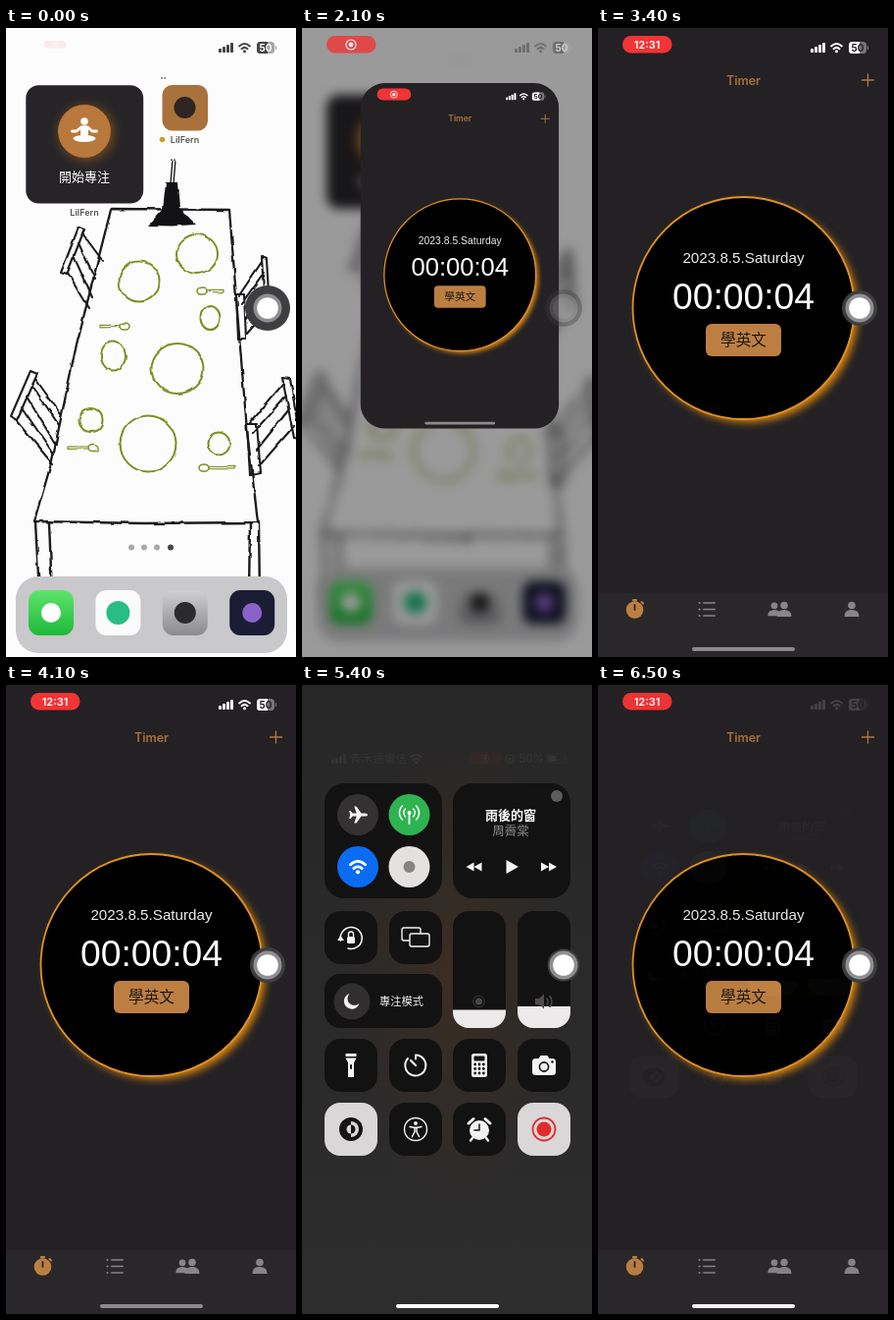
Write an HTML page that moves like this. It is 296x640 px and loops after 6.6 s.

```html
<!DOCTYPE html>
<html lang="zh-Hant">
<head>
<meta charset="utf-8">
<title>Focus timer</title>
<style>
html, body { margin: 0; width: 100%; height: 100%; overflow: hidden; background: #232124 }
svg { display: block; width: 296px; height: 640px; font-family: Inter, "Noto Sans CJK TC", "Noto Sans CJK", sans-serif }
.time { font-family: "Liberation Sans", Arial, sans-serif }
</style>
</head>
<body>
<svg id="stage" viewBox="0 0 296 640"></svg>
<script>
const LOOP = 6600, DARK = '#131212', LIGHT = '#d9d7d8', BROWN = '#bd7f41', GREY = '#878588';
const $ = id => document.getElementById(id);

// Drawing helpers
const dot = (x, y, r, fill, more = '') => `<circle cx="${x}" cy="${y}" r="${r}" fill="${fill}" ${more}/>`;
const ring = (x, y, r, stroke, w) => dot(x, y, r, 'none', `stroke="${stroke}" stroke-width="${w}"`);
const oval = (x, y, rx, ry, more) => `<ellipse cx="${x}" cy="${y}" rx="${rx}" ry="${ry}" ${more}/>`;
const box = (x, y, w, h, r, fill, more = '') => `<rect x="${x}" y="${y}" width="${w}" height="${h}" rx="${r}" fill="${fill}" ${more}/>`;
const line = (d, stroke, w = 1.5, fill = 'none') =>
  `<path d="${d}" stroke="${stroke}" stroke-width="${w}" fill="${fill}" stroke-linecap="round" stroke-linejoin="round"/>`;
const shape = (d, fill) => `<path d="${d}" fill="${fill}"/>`;
const text = (x, y, s, size, fill, weight = 400, more = 'text-anchor="middle"') =>
  `<text x="${x}" y="${y}" font-size="${size}" fill="${fill}" font-weight="${weight}" ${more}>${s}</text>`;
const at = (x, y, inner) => `<g transform="translate(${x} ${y})">${inner}</g>`;
const group = (id, inner) => `<g id="${id}">${inner}</g>`;

// Status bar parts
const signal = (x, y, fill) => [4, 6, 8, 10].map((h, i) => box(x + i * 4, y - h, 3, h, .8, fill)).join('');
const wifi = (x, y, col, k = 1) => `<g transform="translate(${x} ${y}) scale(${k})">` +
  line('M-5.4-1.6q5.4-4.8 10.8 0M-3 1.2q3-2.6 6 0', col, 2) + dot(0, 3.8, 1.5, col) + '</g>';
const battery = (x, y, fg, back, ink) => box(x, y, 18, 12, 3.5, back) +
  shape(`M${x + 11} ${y}h-7.5a3.5 3.5 0 0 0-3.5 3.5v5a3.5 3.5 0 0 0 3.5 3.5h7.5z`, fg) +
  box(x + 18.8, y + 4, 1.2, 4, .6, back) + text(x + 9, y + 9.6, '50', 10, ink, 700);
const statusBar = (fg, back, ink) => signal(217, 25, fg) + wifi(243.5, 20, fg) + battery(256, 14, fg, back, ink);
const pill = name => group(name + 'Pill', box(25, 8, 50.5, 17.5, 8.5, '#f23434') +
  group(name + 'Rec', ring(50, 17, 5, '#fff', 1.2) + dot(50, 17, 2.4, '#fff')) +
  group(name + 'Clock', text(50, 21, '12:31', 11, '#fff', 600)));

function wallpaper() {
  const ink = '#1b1a1c', green = '#7f8e22';
  const plates = [[195, 230, 21, 20], [136, 258, 20.5, 20.5], [208.5, 295, 10, 12], [109.5, 333.5, 12.5, 15],
    [175, 346.5, 26.5, 25.5], [86.5, 399, 12, 12], [145, 423, 28.5, 28.5], [217, 423, 11.5, 11.5]];
  const spoons = [[121, 303.5, -25], [89, 427, -26], [200, 267.5, 21], [202, 447.5, 31]];
  const sketch =
    line('M108 184L228 185M107 185L96 228 72 322 47 440 29 502M228 185L237 300 246 410 257 502M29 502L140 504 257 503', ink, 2.3) +
    line('M30 503L34 575M44 504L47 575M249 504L248 575M258 503L259 575', ink, 2.4) +
    line('M74 203L80 205 62 251 56 249ZM78 209L98 236M74 219L91 255M69 232L88 274M63 249L85 285', ink, 2.1) +
    line('M25 349L32 352 11 399 5 395ZM30 357L56 393M27 364L54 404M21 375L51 424M16 386L49 434M9 398L48 444', ink, 2.1) +
    line('M261 233L266 235 269 286 264 285ZM261 238L238 272M263 249L240 281M265 266L245 296M268 286L245 312M235 271L243 271 245 316 237 316Z', ink, 2.1) +
    line('M282 356L290 357 300 418 294 417ZM283 362L249 402M286 374L252 412M289 388L256 429M294 405L258 446M246 403L256 403 260 453 249 455Z', ink, 2.1) +
    line('M170 134L168 158M173 134L171 158', ink, 1.4) +
    shape('M163 157h12l2 26 17 17-24 1.5-25-.5 15-17z', '#121114') +
    plates.map(p => oval(...p, `fill="none" stroke="${green}" stroke-width="2"`)).join('') +
    spoons.map(([x, y, n]) => oval(x, y, 5, 3.6, `fill="none" stroke="${green}" stroke-width="1.5"`) +
      line(`M${x + Math.sign(n) * 5} ${y - 1}L${x + n} ${y - 1.2}v2.6L${x + Math.sign(n) * 5} ${y + 1}`, green, 1.2)).join('');
  return box(-60, -60, 416, 760, 0, '#fdfcfd') + `<g filter="url(#wobble)">${sketch}</g>` +
    dot(159, 51, .8, ink) + dot(162, 51, .8, ink);
}

function homeIcons() {
  const sitter = dot(80, 95, 3.8, '#fff') + box(76, 99.5, 8, 11, 3, '#fff') +
    line('M67.5 105h4.5l4.5-4h7l4.5 4h4.5', '#fff', 2.8) + oval(80, 112.5, 11.5, 3.4, 'fill="#fff"');
  const app = ([tile, mark, r], i) => box(23 + i * 68.4, 572, 46, 46, 11, tile) + dot(46 + i * 68.4, 595, r, mark);
  return box(20.3, 58.3, 119.9, 120.2, 13, '#262427') +
    dot(82, 107, 28, '#a8641c', 'opacity=".6" style="filter:blur(6px)"') + dot(80, 105, 27, '#b9783c') + sitter +
    text(80, 156, '開始專注', 13, '#fff', 500) + text(80, 191, 'LilFern', 9, '#555', 600) +
    group('appIcon', box(159.5, 58, 46.5, 46.5, 10, '#a9713b') + dot(182.5, 81, 11, '#2c2522')) +
    dot(159.5, 113.5, 2.8, '#c2a520') + text(182.5, 116.8, 'LilFern', 9, '#555', 600) +
    [128, 141, 154, 168].map((x, i) => dot(x, 528.5, 3, i < 3 ? '#a9a8aa' : '#454446')).join('') +
    box(10, 558, 277, 78, 23, '#c9c8ca') +
    [['url(#green)', '#fff', 10], ['#fbfbfb', '#27bd84', 12], ['url(#steel)', '#2b2b2d', 11], ['#1b1d35', '#8a63c9', 10]].map(app).join('');
}

function timerApp() {
  const person = (x, k = 1) => at(x, 591, `<g transform="scale(${k})">` + dot(0, -3.5, 3.8, GREY) + shape('M-7.5 8q0-7 7.5-7t7.5 7z', GREY) + '</g>');
  return box(0, 0, 296, 640, 0, '#232124') +
    dot(153, 289, 112, '#e08a10', 'style="filter:blur(4px)"') +
    dot(148.5, 285, 113, '#000', 'stroke="#e3921f" stroke-width="1.8"') +
    text(148.5, 57.5, 'Timer', 12.5, '#a8713a', 600) + line('M269.5 53h12M275.5 47v12', '#b07a40', 1.3) +
    text(148.5, 239, '2023.8.5.Saturday', 15.2, '#eee', 400, 'class="time" text-anchor="middle"') +
    text(148.5, 286, '00:00:04', 37.3, '#fff', 400, 'class="time" text-anchor="middle"') +
    box(110, 301, 77, 33, 6, BROWN) + text(148.5, 323, '學英文', 15.6, '#1a1716') +
    box(0, 575, 296, 65, 0, '#29272a') +
    dot(37.5, 592, 8.8, BROWN) + box(35, 581, 5, 2.5, 1, BROWN) + line('M44.5 584l1.5 1.5', BROWN, 2) + line('M37.5 587v5', '#29272a', 1.8) +
    [585, 591.5, 598].map(y => dot(103.5, y, 1.1, GREY) + box(107, y - .8, 13, 1.6, .8, GREY)).join('') +
    person(180, .9) + person(190) + person(259) +
    group('appBar', statusBar('#fff', '#77757a', '#222')) + pill('app') + box(96, 0, 105, 4, 2, '#8b898c', 'id="handle"');
}

function controls() {
  const W = '#f4f3f3';
  const tile = (x, y, w, h, fill = DARK, more = '') => box(x, y, w, h, w > 60 && h > 60 ? 20 : 16, fill, more);
  const cols = [23, 89, 154, 220];
  const skip = s => shape(`M0 0L${s * -8}-4.5v9zM${s * 8} 0L0-4.5v9z`, W);
  const slider = (id, x, top) => `<clipPath id="${id}">${tile(x, 230, 54, 119)}</clipPath>` + tile(x, 230, 54, 119) +
    box(x, top, 54, 349 - top, 0, '#eceaea', `clip-path="url(#${id})"`);
  const cell = line('M0-2v11', '#fff', 1.8) + dot(0, -2, 2, '#fff') +
    line('M-4 2a5.5 5.5 0 0 1 0-8M4 2a5.5 5.5 0 0 0 0-8M-7 5a9.5 9.5 0 0 1 0-14M7 5a9.5 9.5 0 0 0 0-14', '#fff', 1.4);
  const plane = shape('M10 0q0-1.6-3-1.6h-3.5l-5-7h-2.2l2.4 7h-4l-2-2.4h-1.6l1 4-1 4h1.6l2-2.4h4l-2.4 7h2.2l5-7h3.5q3 0 3-1.6z', W);
  const lock = line('M-3 11A11 11 0 1 0-10.5 3', 'currentColor', 1.6) + shape('M-14 3l3.5-5 3.5 5z', 'currentColor') +
    box(-4, -1, 8, 7, 1.5, 'currentColor') + line('M-2.5-1v-2.5a2.5 2.5 0 0 1 5 0v2', 'currentColor', 1.4);
  const torch = shape('M-5.5-12h11v3h-11zM-5.5-7.5h11l-2.5 5v14.5h-6v-14.5z', W) + box(-1, -1, 2, 5, 1, DARK);
  const timer = line('M0-10.5A10.5 10.5 0 1 1-8-7M0-10.5v4', W, 2) + line('M0 0L-5-5', W, 2.2);
  const calc = box(-8, -12, 16, 24, 2.5, W) + box(-5.5, -9.5, 11, 5, 1, DARK) +
    [-1, 3.5, 8].map(y => [-4.3, 0, 4.3].map(x => dot(x, y, 1.4, DARK)).join('')).join('');
  const camera = box(-12, -7, 24, 17, 3.5, W) + shape('M-6-6l2.5-4h7l2.5 4z', W) + ring(0, 1.5, 4.6, DARK, 1.6) + dot(8.5, -3.5, 1.2, DARK);
  const contrast = dot(0, 0, 12, '#151414') + shape('M0-8a8 8 0 0 1 0 16z', LIGHT) + shape('M0-4.5a4.5 4.5 0 0 1 0 9z', '#151414') + shape('M0-4.5a4.5 4.5 0 0 0 0 9z', LIGHT);
  const access = ring(0, 0, 11.5, W, 1.4) + dot(0, -6, 1.9, W) + line('M-6-2.5l4 .8h4l4-.8M-1-1.5v4l-2.5 5M1-1.5v4l2.5 5', W, 1.5);
  const alarm = dot(0, 1, 10, W) + line('M-11-6l5-4.5M11-6l-5-4.5', W, 3) + line('M-7 9l-2 2.5M7 9l2 2.5', W, 2.4) + line('M0-5v6h-5', DARK, 1.5);
  const record = ring(0, 0, 11.5, '#e32b2b', 1.8) + dot(0, 0, 7.5, '#e32b2b');
  const row4 = [torch, timer, calc, camera], row5 = [contrast, access, alarm, record];
  const row = (icons, y) => icons.map((s, i) => tile(cols[i], y, 54, 54, s === contrast || s === record ? LIGHT : DARK) +
    at(cols[i] + 27, y + 27, s)).join('');
  const modules = tile(23, 100, 120, 117) + tile(154, 100, 120, 117) +
    dot(57, 132, 21, '#333132') + at(57, 132, plane) + dot(109.5, 132, 21, '#2fb350') + at(109.5, 132, cell) +
    dot(57, 185, 21, '#0a6cf2') + wifi(57, 185, '#fff', 1.4) + dot(109.5, 185, 21, '#e4e2e1') + dot(109.5, 185, 6, '#858384') +
    dot(260, 113, 6, '#5d5b5c') + text(213, 137, '雨後的窗', 13, '#fff', 600) + text(213, 153, '周霽棠', 12.5, '#8b898a') +
    at(175.5, 185, skip(-1)) + at(252, 185, skip(1)) + shape('M208.5 178l12.5 7-12.5 7z', W) +
    tile(23, 230, 54, 54, DARK, 'id="lockTile"') + at(50, 257, group('lock', lock)) +
    tile(89, 230, 54, 54) + at(116, 257, box(-14, -10, 19, 13, 2, 'none', `stroke="${W}" stroke-width="1.4"`) +
      box(-6, -4, 20, 13, 2, DARK, `stroke="${W}" stroke-width="1.4"`)) +
    slider('light', 154, 330.5) + dot(180.5, 322, 3.6, '#4a4849') + ring(180.5, 322, 5.8, '#3a3839', 1) +
    slider('sound', 220, 327) + shape('M238 319h4l5-4.5v15l-5-4.5h-4z', '#4d4b4c') + line('M250 319q2 3 0 6M253 316.5q4 5.5 0 11', '#4d4b4c', 1.4) +
    tile(23, 294, 120, 55) + dot(51, 322, 18.5, '#302e2f') + at(50.5, 322, shape('M-2-8a8 8 0 1 0 10 10a7 7 0 0 1-10-10z', W)) +
    text(101.5, 326, '專注模式', 11.2, W, 500) + row(row4, 360) + row(row5, 425);
  const bar = signal(30, 82, '#fff') + text(78, 81, '青禾通電信', 11.6, '#fff', 500) + wifi(116.5, 77, '#fff') +
    box(171, 70, 33, 13, 6, '#ef3434') + ring(187, 76.5, 3.8, '#fff', 1) + dot(187, 76.5, 1.8, '#fff') +
    ring(212, 77, 4.2, '#eee', 1.2) + box(210.3, 76, 3.4, 3, .6, '#eee') + text(234, 81, '50%', 11.2, '#fff', 500) +
    box(249.5, 72, 19, 9.5, 3, 'none', 'stroke="#999" stroke-width="1"') + box(251, 73.5, 8.5, 6.5, 1.6, '#fff') + box(269.5, 75, 1.4, 3.6, .7, '#999');
  return box(0, 0, 296, 640, 0, 'url(#haze)') + box(0, 0, 296, 640, 0, 'url(#glow)') +
    group('modules', modules) + group('ccBar', bar) + box(96, 630, 105, 4, 2, '#f2f2f2', 'id="ccHandle"');
}

const fadeDown = (id, from, to) => `<linearGradient id="${id}" x2="0" y2="1"><stop stop-color="${from}"/><stop offset="1" stop-color="${to}"/></linearGradient>`;

$('stage').innerHTML = `<defs>
  <clipPath id="window"><rect id="frame" width="296"/></clipPath>
  <filter id="wobble" filterUnits="userSpaceOnUse" x="-20" y="100" width="340" height="500" color-interpolation-filters="sRGB">
    <feTurbulence type="fractalNoise" baseFrequency=".07" numOctaves="2" seed="4"/>
    <feDisplacementMap in="SourceGraphic" scale="3.5" xChannelSelector="R" yChannelSelector="G"/>
  </filter>
  ${fadeDown('haze', '#282727', '#2e2d2d')}${fadeDown('green', '#5fe46c', '#1eb83a')}${fadeDown('steel', '#cfcfd1', '#8b8b8e')}
  <radialGradient id="glow" cx=".53" cy=".46" r=".4"><stop stop-color="#4a3018" stop-opacity=".6"/><stop offset="1" stop-color="#2d2b2b" stop-opacity="0"/></radialGradient>
  </defs>` +
  group('home', group('wall', wallpaper()) + group('icons', homeIcons()) + box(0, 0, 296, 640, 0, '#000', 'id="dim"') +
    group('homeBar', statusBar('#454446', '#a5a4a6', '#fff')) + pill('home')) +
  `<g id="app" clip-path="url(#window)">${timerApp()}</g>` + group('cc', controls()) +
  group('touch', dot(267, 285, 20, '#3e3d3f', 'id="rim"') + dot(267, 285, 14.5, '#8f8e90') + dot(267, 285, 10.8, '#fff', 'id="core"'));

// Linear interpolation through [time, value, time, value, ...]
function key(t, k) {
  if (t <= k[0]) return k[1];
  for (let i = 2; i < k.length; i += 2)
    if (t <= k[i]) return k[i - 1] + (k[i + 1] - k[i - 1]) * (t - k[i - 2]) / (k[i] - k[i - 2]);
  return k[k.length - 1];
}
const set = (id, name, value) => $(id).setAttribute(name, value);
const fade = (id, value) => set(id, 'opacity', value);
const zoom = (x, y, sx, sy = sx) => `translate(${x} ${y}) scale(${sx} ${sy}) translate(${-x} ${-y})`;

// The window springs from the app icon to the full screen; returns its progress
function launch(t) {
  const s = Math.max(0, t - 1900) / 1000 * 10.6;
  let p = 1 - (1 + s) * Math.exp(-s);
  if (p > .995) p = 1;
  const w = 47 + 249 * p, h = 47 + 593 * p ** 1.42, k = w / 296;
  set('app', 'transform', `translate(${182.5 - 34.5 * p - w / 2} ${84.5 + 235.5 * p - h / 2}) scale(${k})`);
  fade('app', Math.min(1, p * 5));
  set('frame', 'height', h / k);
  set('frame', 'rx', 38 * Math.min(1, (1 - p) * 2.6));
  set('handle', 'y', h / k - 10);
  $('home').style.display = p < 1 ? '' : 'none';
  set('wall', 'transform', zoom(148, 320, 1 + .11 * p));
  set('icons', 'transform', zoom(148, 320, 1 - .06 * p));
  for (const id of ['wall', 'icons']) $(id).style.filter = p ? `blur(${Math.min(6, p * 9)}px)` : '';
  fade('appIcon', p ? 0 : 1);
  fade('dim', .63 * p);
  fade('homeBar', 1 - .8 * p);
  return p;
}

function render(t) {
  const p = launch(t);
  const grow = key(t, [0, .45, 300, 1]);
  set('homePill', 'transform', zoom(50, 17, grow));
  fade('homePill', key(t, [0, .08, 300, 1]) * (1 - .35 * p));
  const clock = key(t, [3000, 0, 3200, 1]);
  fade('homeClock', 0);
  fade('appClock', clock);
  fade('appRec', 1 - clock);
  fade('appBar', key(t, [4200, 1, 4300, 0, 6400, 0, 6600, .3]));
  set('handle', 'fill', t < 4300 ? '#8b898c' : '#f2f2f2');

  const open = key(t, [4200, 0, 4300, .35, 4400, .8, 4500, 1, 5900, 1, 6100, .7, 6300, .25, 6500, .02]);
  const stretch = key(t, [4200, -5, 4300, -3, 4400, -1, 4500, 0, 4700, .5, 5100, 1, 5900, 1, 6200, -1.2, 6500, -3.5]);
  fade('cc', open);
  $('cc').style.display = open ? '' : 'none';
  $('app').style.filter = open ? `blur(${10 * open * open}px)` : '';
  set('modules', 'transform', zoom(148.5, 189, 1 - .016 * (1 - stretch), 1 - .045 * (1 - stretch)));
  fade('ccBar', key(t, [5000, 1, 5400, .05, 5600, 0]));
  set('ccBar', 'transform', `translate(0 ${key(t, [5000, 0, 5400, -2])})`);
  const locked = t < 5200;
  set('lockTile', 'fill', locked ? LIGHT : DARK);
  set('lock', 'color', locked ? '#e8504f' : '#f4f3f3');
  set('lock', 'transform', `scale(${locked ? -1 : 1} 1)`);
  set('ccHandle', 'fill', t < 5000 ? '#d2d1d1' : '#fff');

  const active = key(t, [100, 1, 700, 0, 2900, 0, 3200, 1]);
  fade('touch', .35 + .65 * active);
  fade('core', .35 + .65 * active);
  set('rim', 'r', key(t, [0, 23, 700, 22, 1700, 22, 2100, 19, 3400, 18, 4200, 18, 4500, 16.5, 6000, 16.5, 6500, 18]));
}

const start = performance.now();
let shown = -1;
function tick() {
  const t = Math.floor((performance.now() - start) % LOOP / 100) * 100;
  if (t !== shown) render(shown = t);
  requestAnimationFrame(tick);
}
tick();
</script>
</body>
</html>
```
